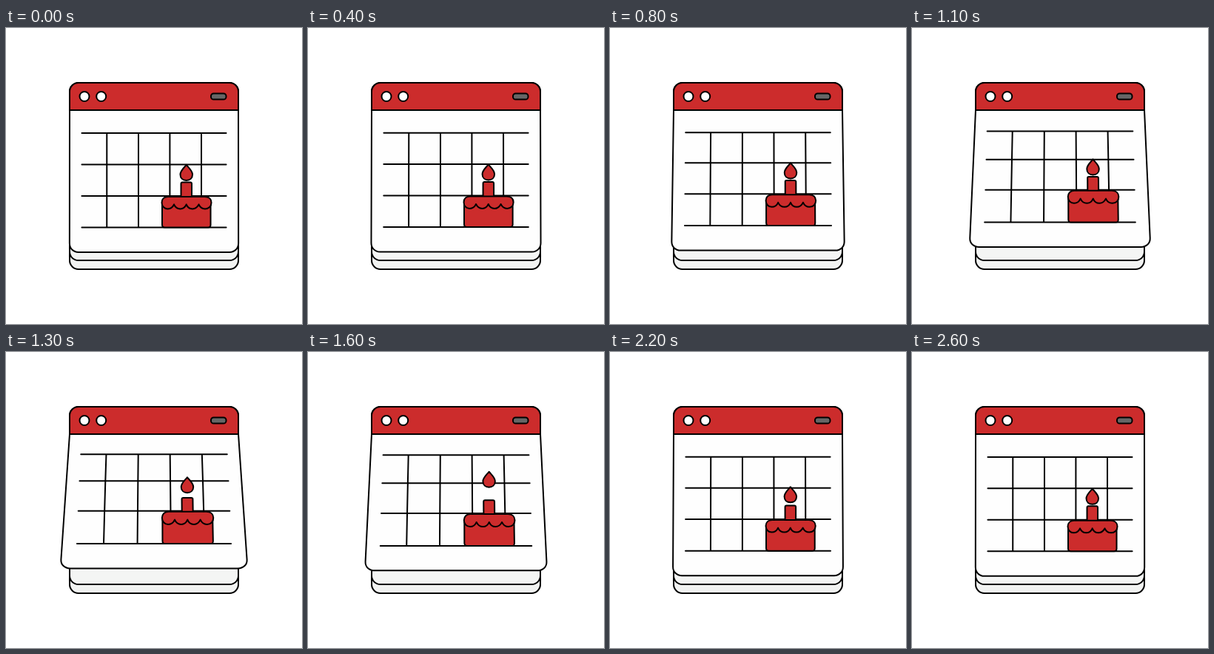
An HTML page that plays this animation: 400x400 px, repeating every 2.71 s.

```html
<!DOCTYPE html>
<html lang="en">
<head>
<meta charset="utf-8">
<title>Birthday calendar</title>
<style>
  html, body { margin: 0; width: 100%; height: 100%; overflow: hidden; background: #fff; }
  svg { display: block; width: 100%; height: 100%; }
</style>
</head>
<body>
<svg viewBox="0 0 400 400" stroke="#000" stroke-width="2" stroke-linecap="round" stroke-linejoin="round">
  <rect x="86" y="74" width="228" height="252" rx="12" fill="#f2f3f2"/>
  <path d="M86 200V302C86 309 91 314 98 314H302C309 314 314 309 314 302V200" fill="#f4f5f4"/>
  <path id="page" fill="#fefefe"/>
  <path id="grid" fill="none"/>
  <g fill="#cc2c2c">
    <path id="candle"/>
    <path id="base"/>
    <path id="icing"/>
    <path id="flame" d="M243.7 185C247 189 252 193 252 198C252 203 248.500 206 243.700 206C239 206 235.500 203 235.500 198C235.500 193 240.500 189 243.700 185Z"/>
    <path d="M86 111V86A12 12 0 0 1 98 74H302A12 12 0 0 1 314 86V111Z"/>
  </g>
  <g fill="#fff">
    <circle cx="106" cy="92.5" r="6.5"/>
    <circle cx="128.700" cy="92.5" r="6.5"/>
  </g>
  <rect x="277" y="88.500" width="20.500" height="8" rx="3.600" fill="#666"/>
</svg>
<script>
const LOOP = 2710, STEP = 100;
const HINGE = 111, PAGE_H = 192, MID = 200;
const rows = [142, 184.5, 227, 269.5];
const cols = [136.3, 179, 221.4, 264];
const $ = id => document.getElementById(id);

// Upward shift of the bent sheet at a few heights, for a lift of 1.
const bend = [[111, 0], [142, 2.8], [184.5, 7.5], [227, 9.1], [269.5, 7.7], [303, 7.8]];

const grid = rows.map(y => `M102.5 ${y}L297.5 ${y}`).join('') +
  cols.map(x => 'M' + rows.map(y => `${x} ${y}`).join('L')).join('');

// Each shape has a path and the amount it widens towards the bottom.
const shapes = {
  page: ['M86 111L86 291C86 298 91 303 98 303L302 303C309 303 314 298 314 291L314 111Z', 0.08],
  grid: [grid, 0.06],
  candle: ['M236.5 232L236.5 210.5C236.5 209 237 208.5 238.5 208.5L249 208.5C250.5 208.5 251 209 251 210.5L251 232Z', 0.04],
  base: ['M211 236L211 266C211 268.5 212 269.5 214.5 269.5L273 269.5C275.5 269.5 276.5 268.5 276.5 266L276.5 236Z', 0.04],
  icing: ['M210.5 236C210.5 231 214 228 219 228L268.5 228C274 228 277.5 231 277.5 236' +
    'C277.5 241 274 244.5 269 244.5C265 244.5 262 242 260.5 238.5' +
    'C258.5 242.5 256 244.5 252 244.5C248 244.5 245 242 243.7 238.5' +
    'C242 242.5 239 244.5 235.5 244.5C231.5 244.5 228.5 242 227 238.5' +
    'C225.5 242 223 244.5 218.5 244.5C214 244.5 210.5 241 210.5 236Z', 0.04]
};

function rise(y) {
  let i = 1;
  while (i < bend.length - 1 && y > bend[i][0]) i++;
  const [y0, a] = bend[i - 1], [y1, b] = bend[i];
  return a + (b - a) * (y - y0) / (y1 - y0);
}

function warp(x, y, lift, spread) {
  const wide = 1 + spread * lift * (y - HINGE) / PAGE_H;
  return [MID + (x - MID) * wide, y - rise(y) * lift];
}

function warpPath(d, lift, spread) {
  return d.replace(/([\d.]+) ([\d.]+)/g, (m, x, y) =>
    warp(+x, +y, lift, spread).map(v => v.toFixed(2)).join(' '));
}

const ease = u => (1 - Math.cos(Math.PI * Math.min(1, Math.max(0, u)))) / 2;
const liftAt = t => 1.4 * Math.cosh((t - 1365) / 285) ** -1.15;
const hopAt = t => 15 * ease((t - 1130) / 470) * ease((2370 - t) / 770);

function draw(t) {
  const lift = liftAt(t);
  for (const id in shapes) {
    const [d, spread] = shapes[id];
    $(id).setAttribute('d', warpPath(d, lift, spread));
  }
  const [x, y] = warp(243.7, 208, lift, 0.04);
  $('flame').setAttribute('transform', `translate(${x - 243.7} ${y - 208 - hopAt(t)})`);
}

const start = performance.now();
function tick() {
  const t = (performance.now() - start) % LOOP;
  draw(Math.min(26, Math.floor(t / STEP)) * STEP);
  requestAnimationFrame(tick);
}
tick();
</script>
</body>
</html>
```
